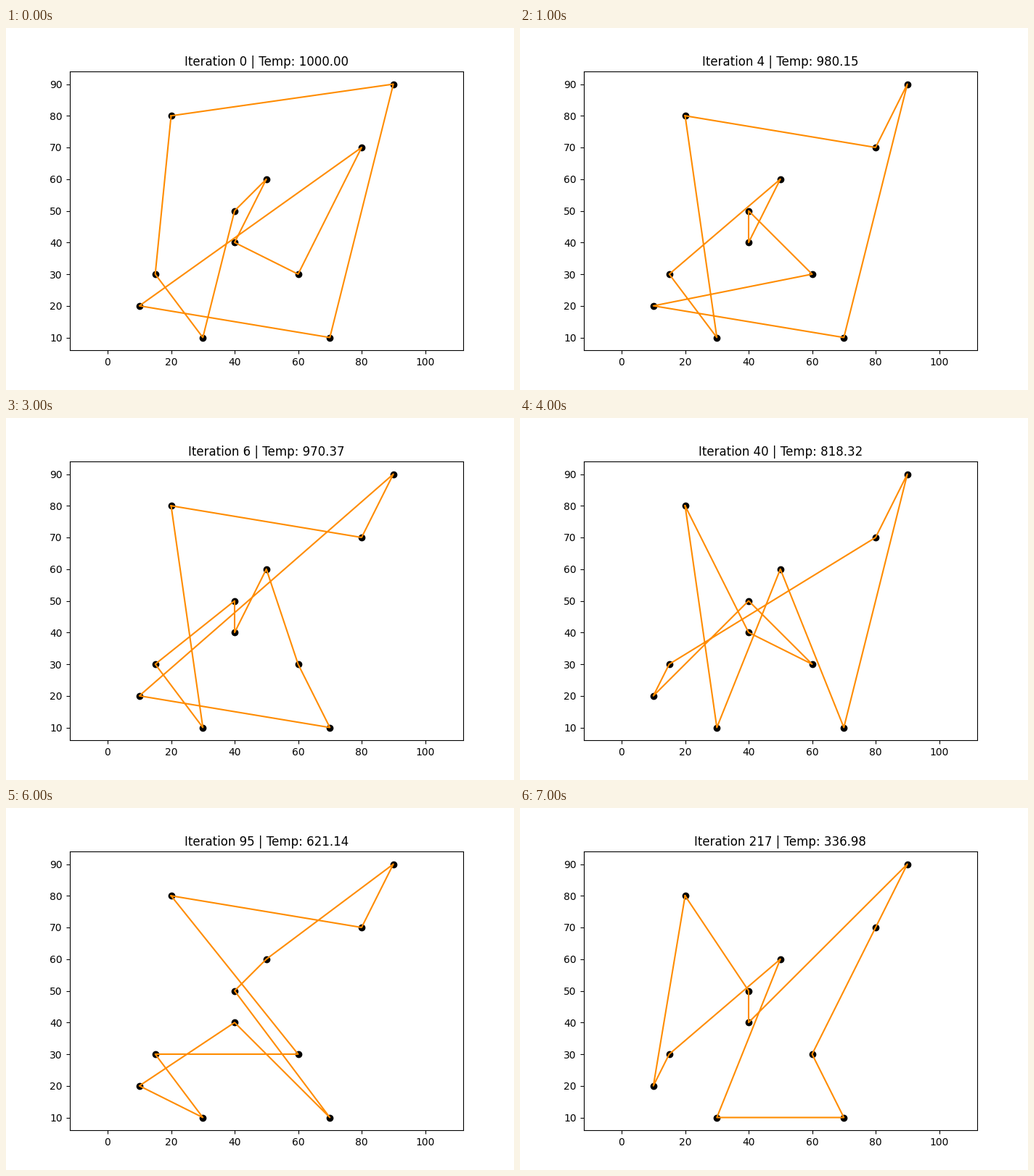
Recreate the animation shown at these times as a matplotlib script. Size 700 by 500 pixels, loop 8000 ms.

```python
import matplotlib.pyplot as plt
from matplotlib.animation import FuncAnimation

CITIES = {
    "A": (20, 80), "B": (80, 70), "C": (90, 90), "D": (10, 20),
    "E": (70, 10), "F": (60, 30), "G": (50, 60), "H": (40, 40),
    "I": (40, 50), "J": (15, 30), "K": (30, 10),
}
START_TEMP = 1000
COOLING = 0.995

# Accepted tours of the annealing run: (iteration, visiting order)
STEPS = [
    (0, "ACEDBFHGIKJ"),
    (4, "ABCEDFIHGJK"),
    (5, "ABCEDFGHIJK"),
    (6, "ABCDEFGHIJK"),
    (40, "AHFIDJBCEGK"),
    (74, "AIFHDJBCGEK"),
    (95, "ABCGIEHDKJF"),
    (217, "AIHCBFEKGJD"),
]

fig, ax = plt.subplots(figsize=(7, 5), dpi=100)
ax.scatter(*zip(*CITIES.values()), color="black")
route, = ax.plot([], [], color="darkorange")
title = ax.set_title("")
ax.set_ylim(6, 94)
ax.set_xlim(-12, 112)


def draw(frame):
    iteration, order = STEPS[frame]
    xs, ys = zip(*(CITIES[c] for c in order + order[0]))
    route.set_data(xs, ys)
    temp = START_TEMP * COOLING ** iteration
    title.set_text(f"Iteration {iteration} | Temp: {temp:.2f}")
    return route, title


anim = FuncAnimation(fig, draw, frames=len(STEPS), interval=1000, repeat=True)
plt.show()
```
